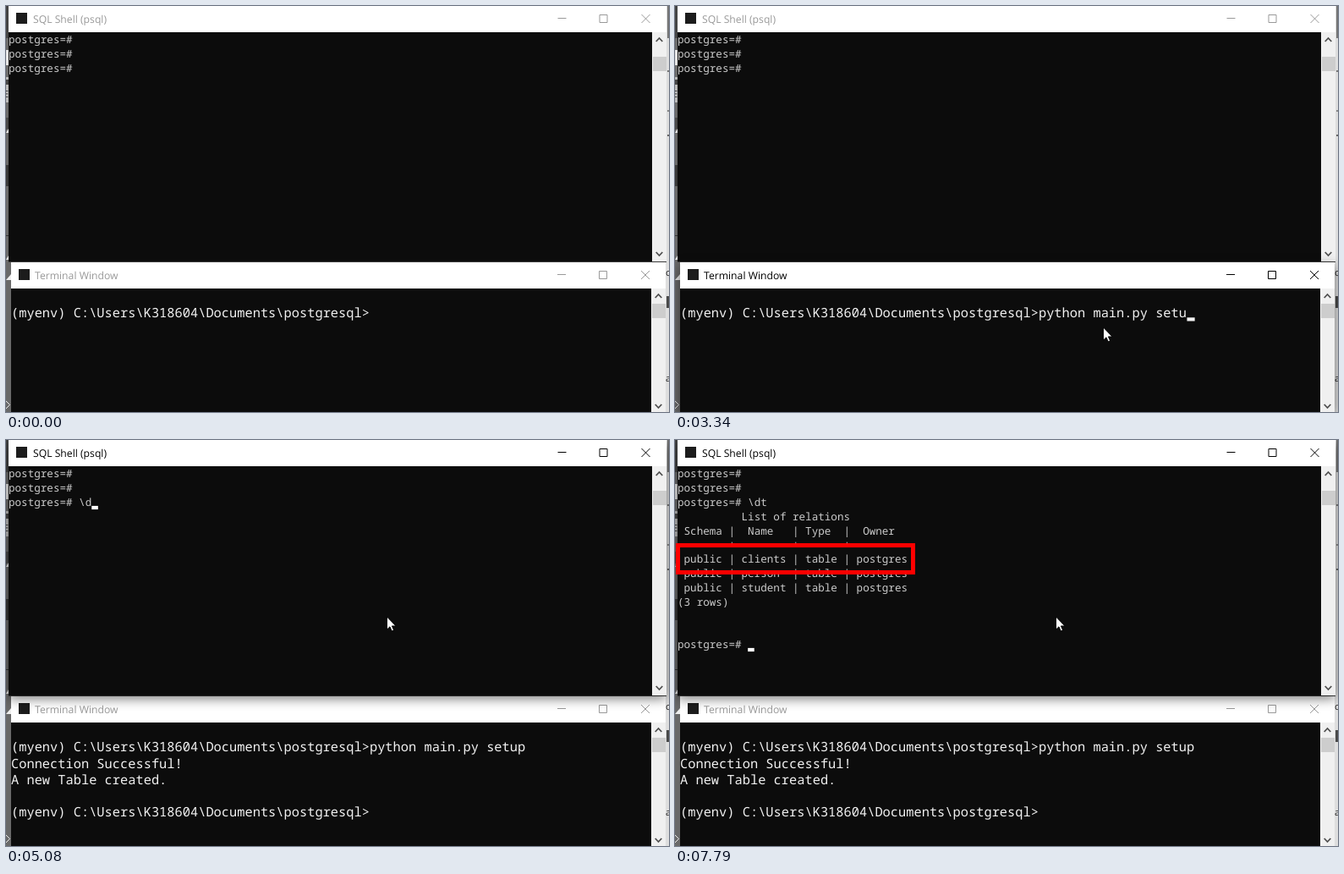
An HTML page for the animation above (8 s loop, 784 by 480 pixels).

```html
<!DOCTYPE html>
<html lang="en">
<head>
<meta charset="utf-8">
<title>Setting up a table</title>
<style>
  html, body { margin: 0; width: 100%; height: 100%; overflow: hidden; background: #666; }
  svg { display: block; width: 784px; height: 480px; }
  text { white-space: pre; text-rendering: geometricPrecision; }
  .title { font: 12.2px "Open Sans", "Noto Sans", sans-serif; fill: #999; }
  .lines { font-family: "Noto Sans Mono", "DejaVu Sans Mono", monospace; }
  .buttons { fill: none; stroke: #999; }
  .active .title { fill: #000; }
  .active .buttons { stroke: #000; }
  .shade { fill: #000; opacity: 0; filter: blur(7px); }
  .active .shade { opacity: .5; }
  .chevron { fill: none; stroke: #505050; stroke-width: 1.8; }
  #mark { fill: none; stroke: #fe0000; stroke-width: 5; }
  #ripple { fill: none; stroke: #fe0000; stroke-width: 3; }
  #pointer path { fill: #fff; stroke: #000; stroke-width: .9; }
</style>
</head>
<body>
<svg id="stage" viewBox="0 0 784 480">
  <g id="desktop"></g>
  <g id="overlay">
    <path id="mark" d="M3.5 122V156.5H281.5V124.5H1" pathLength="100"/>
    <circle id="ripple"/>
    <g id="pointer">
      <path id="arrow" d="M.5 0V15L4 11.8L6.2 16.8L8.6 15.8L6.4 10.9H11Z"/>
      <path id="resize" d="M0 -8.5L4.3 -4H1.2V4H4.3L0 8.5L-4.3 4H-1.2V-4H-4.3Z"/>
    </g>
  </g>
</svg>
<script>
const LOOP = 8000, STEP = 30;
const $ = id => document.getElementById(id);
const stage = $('stage'), overlay = $('overlay');

function add(parent, tag, attrs, content = '') {
  const el = document.createElementNS('http://www.w3.org/2000/svg', tag);
  for (const k in attrs) el.setAttribute(k, attrs[k]);
  el.textContent = content;
  parent.append(el);
  return el;
}
const rect = (parent, x, y, width, height, fill) =>
  add(parent, 'rect', { x, y, width, height, fill });

// Slivers of the desktop behind the windows
const desktop = $('desktop');
[
  [0, 0, 6, 480, '#696969'], [0, 0, 3, 38, '#444'], [0, 52, 3, 18, '#e4e4e4'],
  [0, 84, 3, 30, '#b9b9b9'], [0, 87, 3, 6, '#444'], [0, 132, 3, 14, '#484848'],
  [0, 188, 3, 25, '#383838'], [0, 271, 3, 1, '#333'],
  [780, 0, 4, 480, '#dedede'], [782, 0, 2, 38, '#777'], [782, 76, 2, 2, '#777'],
  [781, 343, 3, 14, '#4a4a4a'], [782, 152, 2, 2, '#666'], [782, 123, 2, 2, '#888']
].forEach(r => rect(desktop, ...r));
add(desktop, 'path', { d: 'M0 150L3 145V150ZM0 300L3 295V300ZM0 324L6 317V324Z', fill: '#eee' });
add(desktop, 'path', { d: 'M0 467L4.5 471.5L0 476', fill: 'none', stroke: '#eee' });
const edge = { x: 780, 'font-size': 11, 'font-family': 'Open Sans, sans-serif', fill: '#222' };
add(desktop, 'text', { ...edge, y: 319 }, 'c');
add(desktop, 'text', { ...edge, y: 444 }, 'a');
add(desktop, 'text', { ...edge, x: -3, y: 108 }, 'E');

function makeWindow(o) {
  const { x, y, right, bottom, bar, size, leading, base, ink } = o;
  const g = add(stage, 'g', {}), mid = y + 15, c = right - 8.5;
  add(g, 'rect', { class: 'shade', x, y: y + 4, width: right - x, height: bottom - y });
  rect(g, x, y, right - x, 31, '#fff');
  rect(g, x, y + 31, bar - x, bottom - y - 31, '#0c0c0c');
  rect(g, bar, y + 31, right - bar, bottom - y - 31, '#f0f0f0');
  rect(g, bar + 1, o.thumb, right - bar - 1, 17, '#cdcdcd');
  const arrow = (top, d) => add(g, 'path', {
    class: 'chevron', d: `M${c - 3.8} ${top + d * 2}L${c} ${top - d * 2}L${c + 3.8} ${top + d * 2}`
  });
  arrow(y + 40, 1);
  arrow(o.down, -1);
  rect(g, o.icon, y + 8, 13, 13, '#1c1c1c');
  const title = add(g, 'text', { class: 'title', x: o.titleX, y: mid + 4.7 }, o.title);
  const b = o.buttons;
  add(g, 'path', {
    class: 'buttons',
    d: `M${b} ${mid - .5}h10M${b + 49.5} ${mid - 4.5}h9v9h-9ZM${b + 99} ${mid - 5}l10 10m0 -10l-10 10`
  });
  const lines = add(g, 'g', { class: 'lines', 'font-size': size, fill: ink });
  const caret = rect(g, 0, 0, size * .6, 4.2, ink === '#ccc' ? '#fff' : ink);
  let shown = null;
  return {
    g, title,
    show(text, blink) {
      const rows = text.split('\n'), last = rows.length - 1;
      if (text !== shown) {
        lines.replaceChildren();
        rows.forEach((row, i) => add(lines, 'text', { x, y: base + i * leading }, row));
        shown = text;
      }
      caret.setAttribute('x', x + rows[last].length * size * .6);
      caret.setAttribute('y', base + last * leading);
      caret.style.display = blink ? '' : 'none';
    }
  };
}

const NAME = 'Terminal Window';
const shell = makeWindow({
  x: 3, y: 0, right: 781, bottom: 302, bar: 764, thumb: 60, down: 293,
  icon: 12, titleX: 32, title: 'SQL Shell (psql)', buttons: 652.5,
  size: 12.6, leading: 16.8, base: 44.3, ink: '#ccc'
});
const term = makeWindow({
  x: 6, y: 303, right: 780, bottom: 480, bar: 763, thumb: 352, down: 473,
  icon: 15, titleX: 34, title: NAME, buttons: 652,
  size: 15.37, leading: 19.25, base: 368.3, ink: '#f2f2f2'
});
rect(desktop, 3, 302, 778, 1, '#3a3a3a');
stage.append(overlay);

// Each row: start time, console text, caret visible
const prompt = '(myenv) C:\\Users\\K318604\\Documents\\postgresql>';
const command = 'python main.py setup';
const typed = n => prompt + command.slice(0, n);
const running = typed(20) + '\n';
const connected = running + 'Connection Successful!\n';
const termLog = [
  [0, prompt, 0], [1700, prompt, 1], [1980, typed(1), 1], [2240, typed(2), 1],
  [2300, typed(3), 1], [2430, typed(4), 1], [2590, typed(5), 1], [2750, typed(18), 1],
  [2980, typed(18), 0], [3340, typed(19), 1], [3500, typed(19), 0], [3700, typed(20), 1],
  [3930, running, 1], [4020, connected, 1],
  [4080, connected + 'A new Table created.\n\n' + prompt, 0]
];

const ps = 'postgres=# ';
const ready = `${ps}\n${ps}\n${ps}`;
const row = name => ` public | ${name.padEnd(7)} | table | postgres`;
const listing = [
  ready + '\\dt',
  '          List of relations',
  ' Schema |  Name   | Type  |  Owner',
  '--------+---------+-------+----------',
  row('clients'), row('person'), row('student'),
  '(3 rows)', '', '', ps
].join('\n');
const shellLog = [
  [0, ready, 0], [4600, ready, 1], [4980, ready + '\\', 1], [5080, ready + '\\d', 1],
  [5280, ready + '\\d', 0], [5780, ready + '\\d', 1], [5840, ready + '\\dt', 1],
  [6270, listing, 0], [6730, listing, 1], [7260, listing, 0], [7790, listing, 1]
];

const path = [[990, 482, 484], [1410, 506, 380], [4210, 506, 380], [4300, 528, 309], [4570, 450, 209]];
const clicks = [[1610, 500, 380], [4770, 444, 209]];

const current = (log, t) => log.findLast(e => e[0] <= t);

function pointerAt(t) {
  const i = path.findLastIndex(p => p[0] <= t);
  const a = path[i], b = path[i + 1];
  if (!b) return a.slice(1);
  const k = 1 - (1 - (t - a[0]) / (b[0] - a[0])) ** 2;
  return [a[1] + (b[1] - a[1]) * k, a[2] + (b[2] - a[2]) * k];
}

let front;
function activate(win) {
  if (win === front) return;
  front = win;
  for (const w of [shell, term]) w.g.classList.toggle('active', w === win);
  if (win) stage.insertBefore(win.g, overlay);
}

function drawPointer(t) {
  const pointer = $('pointer');
  pointer.style.display = t < 990 ? 'none' : '';
  if (t < 990) return;
  const [x, y] = pointerAt(t), border = y > 301 && y < 312;
  pointer.setAttribute('transform', `translate(${x} ${y})`);
  $('resize').style.display = border ? '' : 'none';
  $('arrow').style.display = border ? 'none' : '';
}

function drawRipple(t) {
  const ripple = $('ripple'), click = current(clicks, t);
  const k = click ? Math.floor((t - click[0]) / STEP) / 7 : 1;
  ripple.style.display = k < 1 ? '' : 'none';
  if (k >= 1) return;
  ripple.setAttribute('cx', click[1]);
  ripple.setAttribute('cy', click[2]);
  ripple.setAttribute('r', 1.5 + 19 * k);
  ripple.style.opacity = 1 - k;
}

function drawMark(t) {
  const k = Math.min(1, Math.floor((t - 6430) / STEP) / 30);
  const mark = $('mark');
  mark.style.display = k > 0 ? '' : 'none';
  mark.style.strokeDasharray = k < 1 ? `${Math.max(0, k) * 100} 200` : 'none';
}

function draw(now) {
  const t = now % LOOP;
  activate(t < 1410 ? null : t < 4570 ? term : shell);
  term.show(...current(termLog, t).slice(1));
  shell.show(...current(shellLog, t).slice(1));
  term.title.textContent = t >= 3930 && t < 4080 ? `${NAME} - python  main.py setup` : NAME;
  drawPointer(t);
  drawRipple(t);
  drawMark(t);
}

const start = performance.now();
function tick() {
  draw(performance.now() - start);
  requestAnimationFrame(tick);
}
tick();
</script>
</body>
</html>
```
